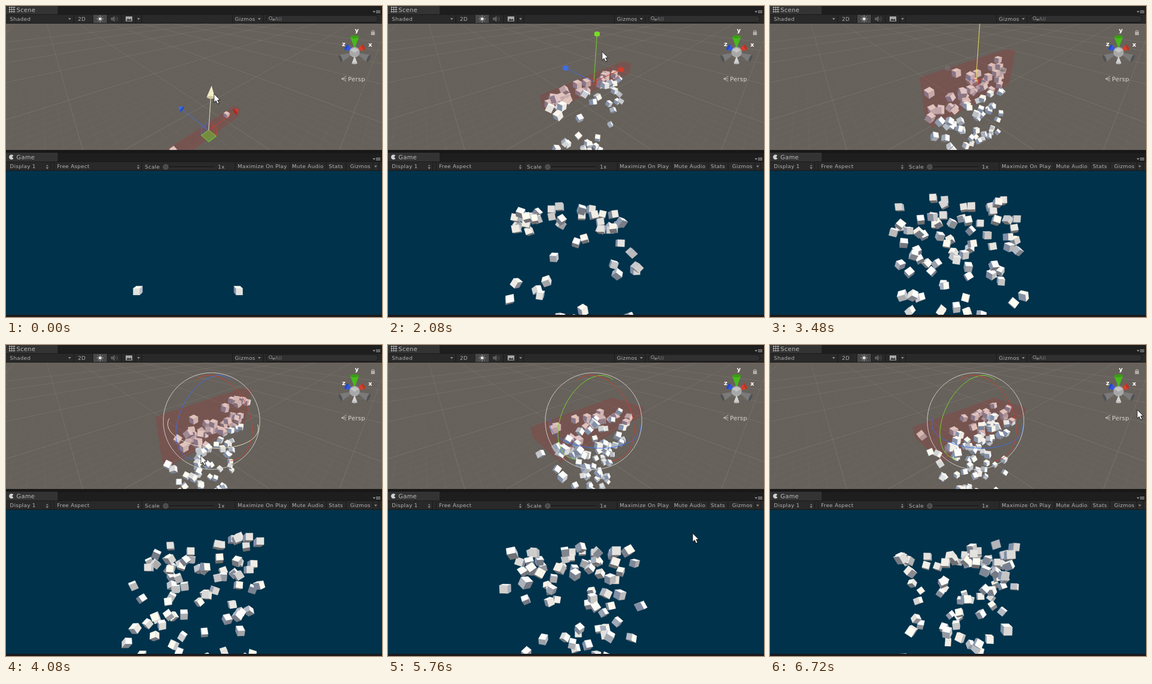
Animation of 685 by 566 pixels, one loop 6760 ms. Source, as an HTML page with a canvas:

```html
<!DOCTYPE html>
<html>
<head>
<meta charset="utf-8">
<style>
html, body { margin: 0; width: 100%; height: 100%; overflow: hidden; background: #1c1c1c; }
canvas { display: block; }
</style>
</head>
<body>
<canvas id="stage" width="685" height="566"></canvas>
<script>
const ctx = document.getElementById('stage').getContext('2d');
const LOOP = 6760, STEP = 40, START = 320, RATE = 60;
const GRAVITY = 7, EDGE = 0.37, LOW = -4.33;
const SCENE = [0, 32, 685, 230], GAME = [0, 300, 685, 262];
const RED = '#cf3e2c', GREEN = '#78dc28', BLUE = '#3c6eeb', YELLOW = '#f0ea5c', CREAM = '#f2edc8', GREY = '#77736f';

function rnd(i, k) {
  let h = Math.imul(i + 1, 0x9e3779b1) ^ Math.imul(k + 1, 0x85ebca6b);
  h = Math.imul(h ^ (h >>> 15), 0x2c1b3c6d);
  h = Math.imul(h ^ (h >>> 13), 0x297a2d39);
  return ((h ^ (h >>> 16)) >>> 0) / 4294967296;
}
const spread = (i, k) => rnd(i, k) * 2 - 1;
const add = (p, d, s) => [p[0] + d[0] * s, p[1] + d[1] * s, p[2] + d[2] * s];

// Interpolates between rows of [time, value, ...] with soft ends.
function track(rows, t) {
  let i = 0;
  while (i < rows.length - 2 && t >= rows[i + 1][0]) i++;
  const a = rows[i], b = rows[i + 1];
  const u = Math.min(1, Math.max(0, (t - a[0]) / (b[0] - a[0])));
  const e = u * u * (3 - 2 * u);
  return a.slice(1).map((v, k) => v + (b[k + 1] - v) * e);
}

const height = t => track([[1120, LOW], [1620, 0]], t)[0];
const scaleY = t => track([[2560, 0.8], [2920, 1.27], [3460, 2.8]], t)[0];
const tilt = t => track([[4620, 0], [5180, Math.PI / 2]], t)[0];
const pointer = t => t < 3700
  ? track([[320, 379, 160], [960, 372, 167], [1120, 372, 167], [1620, 378, 66], [2000, 392, 90],
      [2280, 382, 55], [2560, 384, 54], [2920, 388, 10], [3040, 391, -30], [3400, 396, -180]], t)
  : track([[3700, 396, 70], [4080, 355, 201], [4500, 428, 88], [4620, 428, 88], [4800, 464, 154],
      [5120, 508, 222], [5720, 553, 347], [6000, 590, 270], [6440, 669, 118], [6760, 669, 118]], t);

// ---- cameras ----
function eye([x, y, z]) {
  const h = 0.656 * x + 0.755 * z;
  return [1.18 + 0.755 * x - 0.656 * z, 0.32 + 0.5 * h + 0.866 * y, 10 + 0.866 * h - 0.5 * y];
}
const onScreen = ([r, v, d]) => [342 + 280 * r / d, 147 - 280 * v / d];
const sceneCam = { depth: p => eye(p)[2], project: p => onScreen(eye(p)) };
const gameCam = {
  depth: p => 6.9 + p[2],
  project: ([x, y, z]) => [342 + 227 * x / (6.9 + z), 431 - 227 * (y + 1.6) / (6.9 + z)]
};

// ---- drawing helpers ----
function rect(x, y, w, h, c) { ctx.fillStyle = c; ctx.fillRect(x, y, w, h); }
function trace(pts, close) {
  pts.forEach((p, i) => i ? ctx.lineTo(p[0], p[1]) : ctx.moveTo(p[0], p[1]));
  if (close) ctx.closePath();
}
function poly(pts, c) { ctx.beginPath(); trace(pts, true); ctx.fillStyle = c; ctx.fill(); }
function line(pts, c, w = 1, close = false) {
  ctx.beginPath(); trace(pts, close);
  ctx.strokeStyle = c; ctx.lineWidth = w; ctx.stroke();
}
function disc(x, y, r, c) { ctx.beginPath(); ctx.arc(x, y, r, 0, 7); ctx.fillStyle = c; ctx.fill(); }
function text(s, x, y, size = 9.5, c = '#b4b4b4', weight = '') {
  ctx.font = weight + ' ' + size + 'px "DejaVu Sans", sans-serif';
  ctx.letterSpacing = '0.35px';
  ctx.fillStyle = c; ctx.fillText(s, x, y);
}
function inside(box, draw) {
  ctx.save(); ctx.beginPath(); ctx.rect(...box); ctx.clip();
  draw(); ctx.restore();
}

// ---- solids ----
function rotation(i, angle) {
  const v = [spread(i, 6), spread(i, 7), spread(i, 8)];
  const n = Math.hypot(...v) || 1, [a, b, c] = v.map(q => q / n);
  const s = Math.sin(angle), q = Math.cos(angle), k = 1 - q;
  return [[q + a * a * k, a * b * k + c * s, a * c * k - b * s],
          [a * b * k - c * s, q + b * b * k, b * c * k + a * s],
          [a * c * k + b * s, b * c * k - a * s, q + c * c * k]];
}
function visibleFaces(cam, centre, half, axes) {
  const faces = [];
  for (let k = 0; k < 3; k++) for (const side of [-1, 1]) {
    const u = (k + 1) % 3, v = (k + 2) % 3;
    const mid = add(centre, axes[k], side * half[k]);
    const pts = [[-1, -1], [1, -1], [1, 1], [-1, 1]].map(([a, b]) =>
      cam.project(add(add(mid, axes[u], a * half[u]), axes[v], b * half[v])));
    if (side < 0) pts.reverse();
    const [A, B, C] = pts;
    if ((B[0] - A[0]) * (C[1] - B[1]) - (B[1] - A[1]) * (C[0] - B[0]) > 0)
      faces.push({ n: axes[k].map(q => q * side), pts });
  }
  return faces;
}
function shade([x, y, z]) {
  const lit = Math.max(0, 0.321 * x + 0.766 * y - 0.557 * z), low = Math.max(0, -y);
  const rgb = [130 - 20 * low + 176 * lit, 145 - 37 * low + 146 * lit, 170 - 62 * low + 95 * lit];
  return 'rgb(' + rgb.map(v => Math.min(252, v) | 0) + ')';
}
function drawCube(cam, c) {
  const h = EDGE / 2;
  for (const f of visibleFaces(cam, c.p, [h, h, h], c.axes)) {
    const col = shade(f.n);
    poly(f.pts, col);
    line(f.pts, col, 0.4, true);
  }
}

function boxAxes(t) {
  const a = tilt(t), c = Math.cos(a), s = Math.sin(a);
  return [[1, 0, 0], [0, c, -s], [0, s, c]];
}
const boxHalf = t => [3.7, scaleY(t) / 2, 0.35];

function cubesAt(t) {
  const age0 = Math.max(0, t - START) / 1000, list = [];
  const last = Math.floor(age0 * RATE) + 1;
  for (let i = Math.max(0, last - 130); i <= last; i++) {
    const born = Math.max(0, (i - 1) / RATE), age = age0 - born, at = START + born * 1000;
    const half = boxHalf(at), axes = boxAxes(at);
    let p = [0, height(at), 0];
    if (i < 2) p = [i ? 2.55 : -3.2, LOW, 0.25];
    else axes.forEach((d, k) => { p = add(p, d, spread(i, k) * half[k] * 0.93); });
    p[0] += spread(i, 3) * 0.45 * age;
    p[1] += spread(i, 4) * 0.3 * age - GRAVITY * age * age / 2;
    p[2] += spread(i, 5) * 0.35 * age;
    list.push({ p, axes: rotation(i, spread(i, 9) * 5 * age) });
  }
  return list;
}
const sorted = (list, cam) => list.slice().sort((a, b) => cam.depth(b.p) - cam.depth(a.p));

// ---- scene view ----
function gridLine(a, b, style) {
  let p = eye(a), q = eye(b);
  if (p[2] < 0.5 && q[2] < 0.5) return;
  const cut = (m, n) => m.map((v, k) => v + (n[k] - v) * (0.5 - m[2]) / (n[2] - m[2]));
  if (p[2] < 0.5) p = cut(p, q);
  if (q[2] < 0.5) q = cut(q, p);
  line([onScreen(p), onScreen(q)], style);
}
function fade(top, bottom) {
  const g = ctx.createLinearGradient(0, 32, 0, 262);
  g.addColorStop(0, `rgba(190,186,180,${top})`);
  g.addColorStop(1, `rgba(190,186,180,${bottom})`);
  return g;
}
function grid() {
  const minor = fade(0, 0.06), major = fade(0.12, 0.22), y = -2.36, z0 = 0.7, u = 0.76, far = 76;
  for (let i = -50; i <= 50; i++) {
    const style = i % 10 ? minor : major, k = i * u;
    gridLine([k, y, z0 - far], [k, y, z0 + far], style);
    gridLine([-far, y, z0 + k], [far, y, z0 + k], style);
  }
}
function cone(base, tip, half, c, dark) {
  const a = Math.atan2(tip[1] - base[1], tip[0] - base[0]);
  const nx = -Math.sin(a) * half, ny = Math.cos(a) * half;
  poly([tip, [base[0] + nx, base[1] + ny], [base[0] - nx, base[1] - ny]], c);
  ctx.beginPath();
  ctx.ellipse(base[0], base[1], half * 0.35, half, a, 0, 7);
  ctx.fillStyle = dark || c; ctx.fill();
}
const DIRS = [[1, 0, 0], [0, 1, 0], [0, 0, 1]];

function moveTool(t, o) {
  const size = 4.05 * eye(o)[2] / 12.17, drag = t >= 1060;
  const at = (d, s) => sceneCam.project(add(o, d, size * s));
  const c = at(DIRS[0], 0);
  const colours = drag ? [GREY, YELLOW, GREY] : [RED, CREAM, BLUE];
  if (!drag) {
    const q = size * 0.2;
    [[[-1, 0, 0], [0, 1, 0], BLUE], [[0, 0, -1], [0, 1, 0], RED], [[-1, 0, 0], [0, 0, -1], GREEN]].forEach(([a, b, col], i) => {
      const pts = [o, add(o, a, q), add(add(o, a, q), b, q), add(o, b, q)].map(sceneCam.project);
      ctx.globalAlpha = i == 2 ? 0.4 : 0.14;
      poly(pts, col);
      ctx.globalAlpha = 1;
      line(pts, col, 1, true);
    });
  }
  [0, 2, 1].forEach(k => {
    const base = at(DIRS[k], k == 1 ? 0.77 : 0.86), tip = at(DIRS[k], 1);
    if (!drag || k == 1) line([c, base], colours[k]);
    ctx.globalAlpha = drag && k != 1 ? 0.5 : 1;
    cone(base, tip, k == 1 ? 7.5 : 6, colours[k], ['#a52a1e', drag ? '#b4ac4a' : '#cfc8a0', '#2c50b4'][k]);
    ctx.globalAlpha = 1;
  });
}
function scaleTool(t, o) {
  const drag = t >= 2280, stretch = scaleY(t) / 0.8;
  const c = sceneCam.project(o);
  [0, 2, 1].forEach(k => {
    const col = drag ? [GREY, YELLOW, GREY][k] : [RED, GREEN, BLUE][k];
    const len = k == 1 ? Math.min(3 * stretch, 8) : 3;
    const end = sceneCam.project(add(o, DIRS[k], len));
    line([c, drag && k != 1 ? sceneCam.project(add(o, DIRS[k], 0.7)) : end], drag && k != 1 ? [RED, 0, BLUE][k] : col);
    ctx.globalAlpha = drag && k != 1 ? 0.6 : 1;
    poly([[-5, -3], [0, -5], [5, -3], [5, 3], [0, 5], [-5, 3]].map(p => [end[0] + p[0], end[1] + p[1]]), col);
    ctx.globalAlpha = 1;
  });
  line([[c[0] - 5, c[1] - 4], [c[0] + 5, c[1] - 4], [c[0] + 5, c[1] + 5], [c[0] - 5, c[1] + 5]], RED, 1, true);
}
function ringPoint(o, a, b, angle) {
  const R = 2.84;
  return add(add(o, a, Math.cos(angle) * R), b, Math.sin(angle) * R);
}
function ring(o, a, b, col, full) {
  const e0 = eye(o), n = 120;
  ctx.beginPath();
  let pen = false;
  for (let i = 0; i <= n; i++) {
    const e = eye(ringPoint(o, a, b, i / n * Math.PI * 2));
    const front = e.reduce((s, v, k) => s + (v - e0[k]) * e0[k], 0) < 0;
    const p = onScreen(e);
    if (full || front) pen ? ctx.lineTo(...p) : ctx.moveTo(...p);
    pen = full || front;
  }
  ctx.strokeStyle = col; ctx.lineWidth = 1; ctx.stroke();
}
function rotateTool(t, o) {
  const [x, y, z] = boxAxes(t), drag = t >= 4600 && t < 5160, back = [0, 0, -1];
  const hover = t >= 4000 && t < 4160;
  if (!drag) {
    ctx.beginPath(); ctx.arc(374.5, 138.5, 88, 0, 7);
    ctx.strokeStyle = '#d2d0cc'; ctx.lineWidth = 1; ctx.stroke();
  }
  ring(o, x, y, BLUE);
  ring(o, z, x, hover ? CREAM : GREEN);
  ring(o, DIRS[1], back, drag ? YELLOW : RED, drag);
  if (drag) {
    const from = 0.66, pts = [sceneCam.project(o)];
    for (let i = 0; i <= 16; i++) pts.push(sceneCam.project(ringPoint(o, DIRS[1], back, from + tilt(t) * i / 16)));
    poly(pts, 'rgba(215,200,95,.6)');
    line(pts, YELLOW, 0.8, true);
  }
}
function compass() {
  cone([609.5, 95.5], [635, 84], 7, '#7a7a7a', '#505254');
  cone([660.5, 95.5], [635, 84], 7, '#7a7a7a', '#505254');
  cone([620, 75], [635, 84], 5.5, '#2f58e0', '#2848c4');
  cone([651, 75], [635, 84], 5.5, '#d2402c', '#b83424');
  cone([635, 56], [635, 78], 8, '#48b81c', '#3a9c14');
  disc(635, 84, 9.5, '#a8a8a8');
  poly([[627, 80], [635, 76], [643, 80], [635, 85]], '#c4c4c4');
  cone([635, 104], [635, 91], 5, '#d4d4d4', '#bebebe');
  text('y', 635.5, 48, 11, '#fff', 'bold');
  text('x', 660, 74, 11, '#fff', 'bold');
  text('z', 612, 73, 11, '#fff', 'bold');
  rect(665, 47, 7, 6, '#b0aca8');
  ctx.beginPath(); ctx.arc(668.5, 47, 2.4, Math.PI, 0);
  ctx.strokeStyle = '#b0aca8'; ctx.lineWidth = 1.2; ctx.stroke();
  line([[620, 128], [611, 132.5], [620, 137]], '#c8c6c2');
  line([[611, 132.5], [620, 132.5]], '#c8c6c2');
  text('Persp', 623, 137, 10.8, '#d8d6d2');
}
function sceneView(t, cubes) {
  rect(...SCENE, '#67615b');
  grid();
  const o = [0, height(t), 0], axes = boxAxes(t), half = boxHalf(t);
  const held = c => axes.every((d, k) =>
    Math.abs(d.reduce((s, v, j) => s + v * (c.p[j] - o[j]), 0)) < half[k] + EDGE * 0.4);
  const list = sorted(cubes.filter(c => sceneCam.depth(c.p) > 1), sceneCam);
  list.filter(held).forEach(c => drawCube(sceneCam, c));
  ctx.beginPath();
  visibleFaces(sceneCam, o, half, axes).forEach(f => trace(f.pts, true));
  ctx.fillStyle = 'rgba(155,52,52,.28)'; ctx.fill();
  list.filter(c => !held(c)).forEach(c => drawCube(sceneCam, c));
  (t < 1960 ? moveTool : t < 3640 ? scaleTool : rotateTool)(t, o);
  compass();
}

// ---- window chrome ----
function down(x, y) { poly([[x - 2.5, y - 1.5], [x + 2.5, y - 1.5], [x, y + 2]], '#8c8c8c'); }
function upDown(x, y) { down(x, y + 3); poly([[x - 2, y - 0.5], [x + 2, y - 0.5], [x, y - 3]], '#8c8c8c'); }
function header(y, tabText) {
  rect(0, y, 685, 15, '#1e1e1e');
  rect(0, y, 94, 15, '#333333');
  rect(0, y + 15, 685, 1, '#1a1a1a');
  rect(0, y + 16, 685, 15, '#292929');
  rect(0, y + 31, 685, 1, '#171717');
  text(tabText, 19, y + 11, 10.8, '#bcbcbc');
  down(670.5, y + 10.5);
  for (let i = 0; i < 3; i++) rect(674, y + 8 + i * 2, 8, 1, '#a0a0a0');
}
function dividers(xs, y) { xs.forEach(x => rect(x, y, 1, 15, '#191919')); }
function chrome() {
  header(0, 'Scene');
  for (let i = 0; i < 3; i++) {
    rect(6 + i * 4, 1, 1, 11, '#b4b4b4');
    rect(5, 2 + i * 4, 12, 1, '#b4b4b4');
  }
  dividers([123, 158, 184, 210, 236, 247, 412, 468], 16);
  rect(159, 16, 25, 15, '#484848');
  text('Shaded', 7, 27);
  down(116, 23.5);
  text('2D', 131, 27);
  disc(171.5, 23.5, 2.8, '#e0e0e0');
  for (let i = 0; i < 8; i++) {
    const c = Math.cos(i * Math.PI / 4), s = Math.sin(i * Math.PI / 4);
    line([[171.5 + c * 4, 23.5 + s * 4], [171.5 + c * 6, 23.5 + s * 6]], '#d0d0d0');
  }
  poly([[191, 21], [194, 21], [198, 18], [198, 29], [194, 26], [191, 26]], '#5c5c5c');
  [3, 6].forEach(r => {
    ctx.beginPath(); ctx.arc(197, 23.5, r, -0.9, 0.9);
    ctx.strokeStyle = '#5c5c5c'; ctx.lineWidth = 1; ctx.stroke();
  });
  rect(218, 19, 12, 9, '#a8a8a8');
  poly([[219, 27], [222, 23], [225, 25], [227, 23], [229, 27]], '#333');
  down(241.5, 23.5);
  text('Gizmos', 417, 27);
  down(461.5, 23.5);
  ctx.beginPath(); ctx.roundRect(474.5, 17.5, 203, 12, 6);
  ctx.fillStyle = '#303030'; ctx.fill();
  ctx.strokeStyle = '#151515'; ctx.lineWidth = 1; ctx.stroke();
  ctx.beginPath(); ctx.arc(482, 22, 2.8, 0, 7);
  ctx.strokeStyle = '#888'; ctx.stroke();
  line([[484, 24], [487, 27]], '#888');
  down(488, 25);
  text('All', 490, 27, 9.5, '#777');

  rect(0, 262, 685, 6, '#181818');
  header(268, 'Game');
  rect(0, 267, 94, 2, '#333333');
  ctx.beginPath(); ctx.moveTo(11, 275); ctx.arc(10, 275, 4.5, 0.6, 5.6); ctx.closePath();
  ctx.fillStyle = '#d0d0d0'; ctx.fill();
  dividers([81, 87, 247, 417, 517, 583, 619, 668, 679], 284);
  text('Display 1', 7, 295); upDown(75, 292);
  text('Free Aspect', 93, 295); upDown(241, 292);
  text('Scale', 253, 296);
  rect(287, 292, 93, 3, '#191919');
  rect(287, 294, 93, 1, '#3a3a3a');
  disc(291, 293, 5, '#5c5c5c');
  disc(291, 293, 3.8, '#4a4a4a');
  text('1x', 386, 296);
  text('Maximize On Play', 422, 295);
  text('Mute Audio', 521, 295);
  text('Stats', 588, 295);
  text('Gizmos', 627, 295);
  down(673.5, 292);
  rect(0, 562, 685, 4, '#1c1a1a');
}

function drawPointer(t) {
  const [x, y] = pointer(t);
  if ((t >= 1060 && t < 1640) || (t >= 2280 && t < 3100)) disc(x - 1, y - 1, 11.5, 'rgba(110,110,110,.5)');
  const pts = [[0, 0], [0, 15.5], [3.6, 12.2], [6.2, 18], [9, 16.8], [6.4, 11.2], [11, 11]].map(p => [x + p[0], y + p[1]]);
  poly(pts.map(p => [p[0] + 1, p[1] + 1]), 'rgba(0,0,0,.3)');
  poly(pts, '#fff');
  line(pts, '#161616', 0.9, true);
}

function frame(now) {
  const t = Math.floor(now % LOOP / STEP) * STEP;
  const cubes = cubesAt(t);
  chrome();
  inside(SCENE, () => sceneView(t, cubes));
  inside(GAME, () => {
    rect(...GAME, '#00324b');
    sorted(cubes.filter(c => gameCam.depth(c.p) > 1), gameCam).forEach(c => drawCube(gameCam, c));
  });
  drawPointer(t);
}

let begin = null;
function tick(now) {
  if (begin === null) begin = now;
  frame(now - begin);
  requestAnimationFrame(tick);
}
requestAnimationFrame(tick);
</script>
</body>
</html>
```
